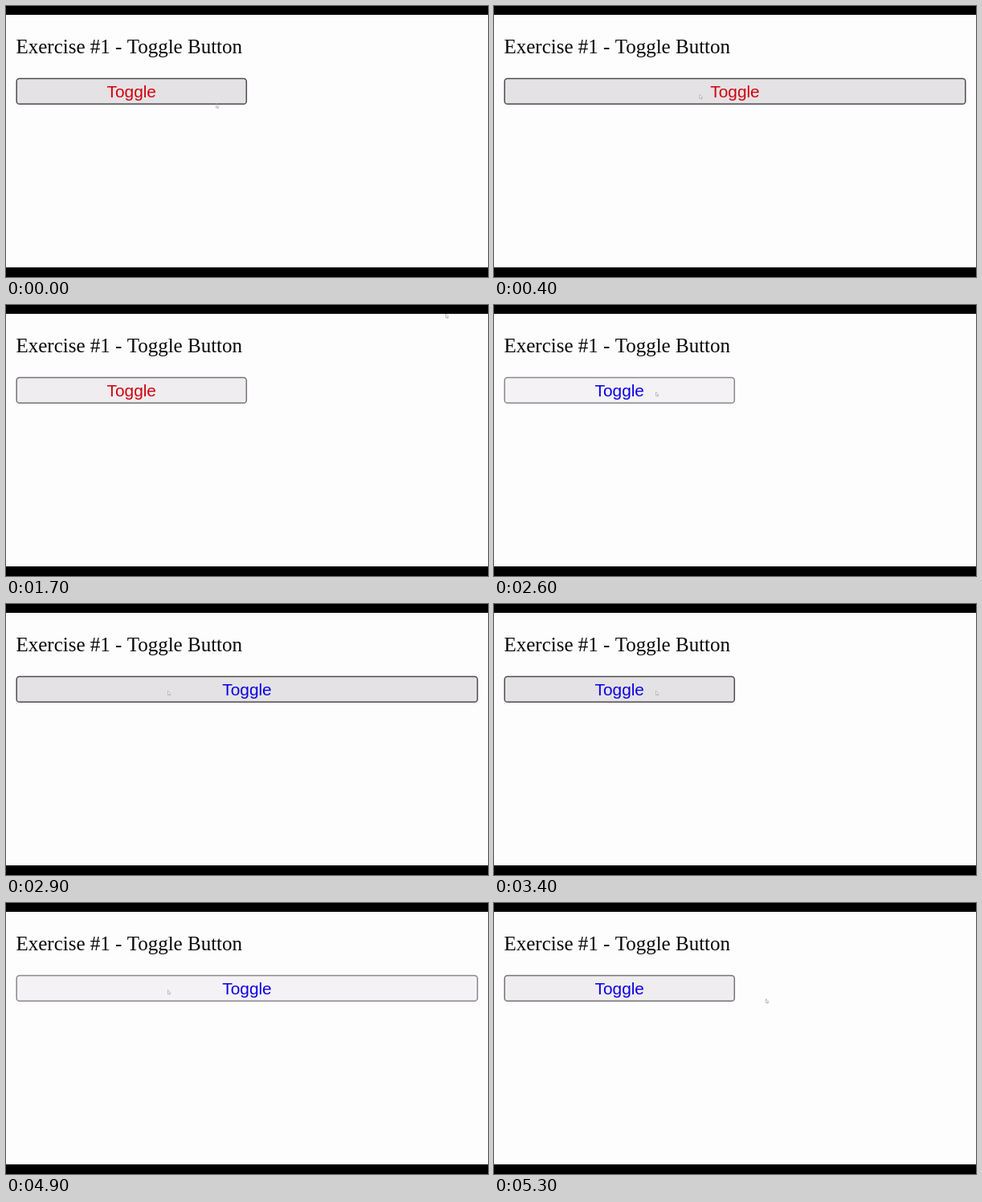
Write an HTML page with a canvas that moves like this. It is 600x338 px and loops after 5.4 s.

```html
<!DOCTYPE html>
<html lang="en">
<head>
<meta charset="utf-8">
<title>Toggle Button</title>
<style>
  html, body { margin: 0; width: 100%; height: 100%; overflow: hidden; background: #fefdfe; }
  canvas { display: block; width: 600px; height: 338px; }
</style>
</head>
<body>
<canvas id="stage" width="600" height="338"></canvas>
<script>
const ctx = document.getElementById('stage').getContext('2d');
const LOOP = 5400, STEP = 100;
const RED = '#d2000f', BLUE = '#0b00e4';

const looks = {
  idle:   { fill: '#efedef', line: '#737274' },
  hover:  { fill: '#e4e2e4', line: '#4c4b4d' },
  active: { fill: '#f4f2f5', line: '#88878a' }
};

// [start ms, button state]
const states = [
  [0, 'hover'], [300, 'active'], [400, 'hover'], [1100, 'active'], [1200, 'hover'],
  [1400, 'idle'], [2200, 'hover'], [2500, 'active'], [2700, 'hover'],
  [3300, 'active'], [3400, 'hover'], [4100, 'active'], [4200, 'hover'],
  [4900, 'active'], [5000, 'hover'], [5300, 'idle']
];

// Each click flips the width; each pointer entry flips the colour.
const clicks = [400, 1200, 2700, 3400, 4200, 5000];
const entries = [2200];

// [start ms, x, y] of the pointer tip
const pointer = [
  [0, 261, 121.5], [100, 258, 116], [200, 255.5, 110], [1300, 286, 121],
  [1400, 375, 92], [1500, 480, 42], [1600, 547, 10.5], [2100, 372, 60],
  [2200, 201, 108], [5200, 268, 114], [5300, 338, 119]
];

const latest = (list, t) => list.filter(e => e[0] <= t).pop();
const flipped = (list, t) => list.filter(e => e <= t).length % 2 === 1;

function text(str, x, y, font, color, align) {
  ctx.font = font;
  ctx.fillStyle = color;
  ctx.textAlign = align;
  ctx.fillText(str, x, y);
}

function drawButton(width, look, color) {
  ctx.beginPath();
  ctx.roundRect(13.2, 90.5, width - 1.4, 31.8, 3.6);
  ctx.fillStyle = look.fill;
  ctx.fill();
  ctx.strokeStyle = look.line;
  ctx.lineWidth = 1.5;
  ctx.stroke();
  text('Toggle', 12.5 + width / 2, 113.5,
    '20.83px "Liberation Sans", Arial, sans-serif', color, 'center');
}

function drawPointer(x, y) {
  ctx.save();
  ctx.translate(x, y);
  ctx.beginPath();
  ctx.moveTo(0.5, 0.5);
  ctx.lineTo(0.5, 5.6);
  ctx.lineTo(1.7, 4.6);
  ctx.lineTo(2.6, 6.4);
  ctx.lineTo(3.3, 6);
  ctx.lineTo(2.6, 4.3);
  ctx.lineTo(4, 4.1);
  ctx.closePath();
  ctx.fillStyle = '#fff';
  ctx.fill();
  ctx.strokeStyle = '#a3a2a5';
  ctx.lineWidth = 0.7;
  ctx.stroke();
  ctx.restore();
}

function draw(t) {
  ctx.fillStyle = '#fefdfe';
  ctx.fillRect(0, 0, 600, 338);
  ctx.fillStyle = '#000';
  ctx.fillRect(0, 0, 600, 11);
  ctx.fillRect(0, 326, 600, 12);
  text('Exercise #1 - Toggle Button', 12.5, 59,
    '25px "Liberation Serif", "Times New Roman", serif', '#080808', 'left');

  const look = looks[latest(states, t)[1]];
  drawButton(flipped(clicks, t) ? 575 : 287.5, look, flipped(entries, t) ? BLUE : RED);
  const [, x, y] = latest(pointer, t);
  drawPointer(x, y);
}

const start = performance.now();
function frame() {
  const t = (performance.now() - start) % LOOP;
  draw(Math.floor(t / STEP) * STEP);
  requestAnimationFrame(frame);
}
frame();
</script>
</body>
</html>
```
